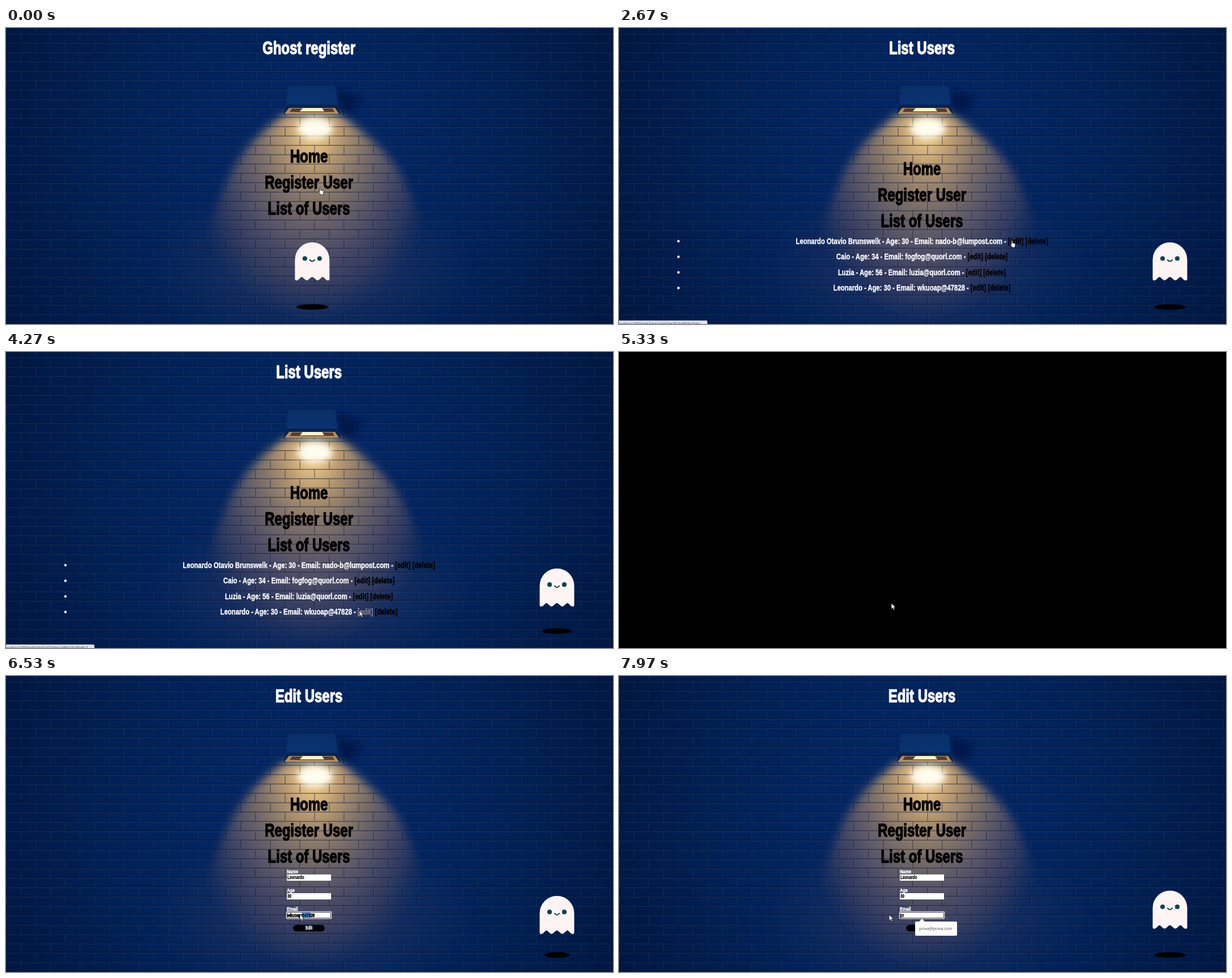
Write an HTML page that moves like this. It is 1072 px wide and 522 px high and loops after 8000 ms.

```html
<!DOCTYPE html>
<html lang="en">
<head>
<meta charset="utf-8">
<title>Ghost register</title>
<style>
  html, body { margin: 0; width: 100%; height: 100%; overflow: hidden; background: #000; }
  svg { display: block; width: 100%; height: 100%; }
  .heavy { font-family: "Liberation Sans", Arial, sans-serif; font-weight: 700; stroke-linejoin: round; }
  .tiny { font-family: "Open Sans", "Noto Sans", sans-serif; }
</style>
</head>
<body>
<svg id="stage" viewBox="0 0 1072 522" xmlns="http://www.w3.org/2000/svg">
  <defs>
    <radialGradient id="wall" gradientUnits="userSpaceOnUse" cx="540" cy="260" r="620">
      <stop offset="0" stop-color="#04296a"/>
      <stop offset=".55" stop-color="#012258"/>
      <stop offset="1" stop-color="#00163f"/>
    </radialGradient>
    <radialGradient id="beam" gradientUnits="userSpaceOnUse" cx="0" cy="0" r="1"
      gradientTransform="translate(542 172) scale(235 345)">
      <stop offset="0" stop-color="#fff0bd"/>
      <stop offset=".1" stop-color="#e2bf83"/>
      <stop offset=".22" stop-color="#b6976f"/>
      <stop offset=".4" stop-color="#857568" stop-opacity=".95"/>
      <stop offset=".62" stop-color="#5d5667" stop-opacity=".85"/>
      <stop offset=".82" stop-color="#43435f" stop-opacity=".6"/>
      <stop offset="1" stop-color="#2a3259" stop-opacity="0"/>
    </radialGradient>
    <radialGradient id="haze">
      <stop offset="0" stop-color="#4b4a66" stop-opacity=".6"/>
      <stop offset="1" stop-color="#2a3763" stop-opacity="0"/>
    </radialGradient>
    <linearGradient id="metal" x2="0" y2="1">
      <stop offset="0" stop-color="#0a2f66"/>
      <stop offset="1" stop-color="#073577"/>
    </linearGradient>
    <pattern id="bricks" width="52" height="33" patternUnits="userSpaceOnUse" x="17" y="8">
      <path d="M0 1H52M0 17.5H52M8 1V17.5M34 17.5V34" fill="none" stroke="#020d30" stroke-opacity=".5" stroke-width="1.3"/>
      <path d="M0 2.4H52M0 18.9H52M9.3 2V17M35.3 19V33" fill="none" stroke="#b9b4c8" stroke-opacity=".12"/>
    </pattern>
    <filter id="soft" x="-20%" y="-20%" width="140%" height="140%"><feGaussianBlur stdDeviation="8"/></filter>
    <filter id="glow" x="-50%" y="-50%" width="200%" height="200%"><feGaussianBlur stdDeviation="6"/></filter>
  </defs>

  <g id="scene">
    <rect width="1072" height="522" fill="url(#wall)"/>
    <ellipse cx="540" cy="420" rx="290" ry="150" fill="url(#haze)"/>
    <path d="M494 152C450 180 405 225 382 290C350 370 330 450 325 522H765C752 420 735 320 690 245C660 205 620 175 588 152Z"
      fill="url(#beam)" filter="url(#soft)"/>
    <rect width="1072" height="522" fill="url(#bricks)"/>
    <ellipse cx="546" cy="177" rx="31" ry="17" fill="#fffdf0" filter="url(#glow)"/>
    <path d="M584 106L628 122 614 150H590Z" fill="#00113a" opacity=".55" filter="url(#glow)"/>
    <path d="M499 102H582L586 136 590 151H490L495 136Z" fill="url(#metal)"/>
    <path d="M495 135H586L590 151H490Z" fill="#08244f"/>
    <path d="M500 141H581L588 151H492Z" fill="#b98d58"/>
    <path d="M505 142H577L580 148H501Z" fill="#503e38"/>
    <path d="M524 141H558L562 147H519Z" fill="#fff3c4"/>
    <g id="page"></g>
    <g id="ghost">
      <ellipse id="shade" cy="492" ry="5"/>
      <g id="spook">
        <path d="M-30.5 30.5A30.5 30.5 0 0 1 30.5 30.5V64Q30.5 68 26.5 67C22 65 21 61 18.5 61S13 67 9.5 67S3 61 0 61S-6 67 -9.5 67S-16 61 -18.5 61S-22 65 -26.5 67Q-30.5 68 -30.5 64Z" fill="#fdf4f3"/>
        <g fill="#0b4650"><circle cx="-13" cy="28.5" r="4.1"/><circle cx="13" cy="28.5" r="4.1"/></g>
        <path d="M-4.2 31Q0 36 4.2 31" fill="none" stroke="#0b4650" stroke-width="2" stroke-linecap="round"/>
      </g>
    </g>
    <g id="status">
      <path id="bar" fill="#dfe2e8" stroke="#aab0bd" stroke-width=".6"/>
      <text id="link" class="tiny" x="-2" y="523" font-size="6.1" fill="#3c4043"></text>
    </g>
  </g>
  <g id="arrow"><path d="M0 0V10.2L2.4 8.1 4 11.8 5.8 11 4.3 7.4H7.3Z" fill="#fff" stroke="#111" stroke-width=".7"/></g>
  <g id="hand"><path d="M0 1.2Q1 -.6 2 1.2V5L6.2 6Q7.3 6.4 7 8L6.2 13H1.6L-1.6 8.6Q-1.4 7 0 8Z" fill="#fff" stroke="#111" stroke-width=".8"/></g>
</svg>
<script>
const LOOP = 8000, PERIOD = 3000, CONDENSE = 0.75;
const $ = id => document.getElementById(id);

// Heavy condensed lettering, one shared proportion for every size
const heavy = (str, x, y, size, fill, anchor = 'middle', weight = size * 0.045) =>
  `<text class="heavy" transform="translate(${x} ${y}) scale(${CONDENSE} 1)" font-size="${size}" ` +
  `text-anchor="${anchor}" fill="${fill}" stroke="${fill}" stroke-width="${weight}">${str}</text>`;

const header = (title, drop) => heavy(title, 535, 46, 32, '#fff') +
  ['Home', 'Register User', 'List of Users']
    .map((s, i) => heavy(s, 535, 237 + drop + i * 45.8, 32, '#000')).join('');

const users = [
  ['Leonardo Otavio Brunswelk', 30, 'nado-b@lumpost.com'],
  ['Caio', 34, 'fogfog@quorl.com'],
  ['Luzia', 56, 'luzia@quorl.com'],
  ['Leonardo', 30, 'wkuoap@47828']
];

function listPage(hot) {
  const rows = users.map(([name, age, mail], i) => {
    const y = 380.5 + i * 27.5;
    const tone = hot && i === 3 ? '#85808a' : '#000';
    const link = (s, c) => `<tspan fill="${c}" stroke="${c}">[${s}]</tspan>`;
    return `<circle cx="105" cy="${y - 4.5}" r="2.2" fill="#fff"/>` +
      heavy(`${name} - Age: ${age} - Email: ${mail} - ${link('edit', tone)} ${link('delete', '#000')}`,
        535, y, 15, '#fff', 'middle', 0.4);
  });
  return header('List Users', 22) + rows.join('');
}

function field(label, value, y) {
  return heavy(label, 496, y - 2, 9.8, '#fff', 'start') +
    `<rect x="496" y="${y}" width="78" height="11" fill="#fff"/>` +
    heavy(value, 497, y + 8.4, 8.6, '#000', 'start', 0.25);
}

// picked: share of the address selected, from its right end
function editPage(focus, picked, typed) {
  const mail = users[3][2];
  let out = header('Edit Users', 0) + field('Name', users[3][0], 350) + field('Age', '30', 383) +
    field('Email', typed || mail, 416.3);
  if (focus) out += '<rect x="495.6" y="415.8" width="78.8" height="12" rx="1.5" fill="none" stroke="#fff" stroke-width="1.6"/>' +
    '<rect x="496.4" y="416.6" width="77.2" height="10.4" rx="1" fill="none" stroke="#111" stroke-width=".9"/>';
  if (picked) {
    const w = 41 * picked;
    out += `<rect x="${538 - w}" y="417.4" width="${w}" height="9" fill="#3b8ee8"/>`;
    out += heavy(mail, 497, 424.7, 8.6, picked > 0.6 ? '#fff' : '#000', 'start', 0.2);
  }
  out += '<rect x="507" y="439" width="56" height="11.5" rx="5.7"/>' + heavy('Edit', 535, 447.4, 8.6, '#fff');
  if (typed) out += '<path d="M525 433H530L535 428 540 433H595Q597 433 597 435V456Q597 458 595 458H525Q523 458 523 456V435Q523 433 525 433Z" fill="#fff"/>' +
    '<text class="tiny" x="530" y="447.8" font-size="6.9" fill="#444">prova@prova.com</text>';
  return out;
}

// time, x, y of the pointer tip
const trail = [
  [0, 554, 281], [100, 554, 281], [350, 549, 318], [500, 549, 322], [930, 575, 351],
  [1070, 693, 374], [2670, 693, 374], [3470, 562, 18], [3750, 575, 60], [4200, 624, 456],
  [4400, 624, 456], [4640, 786, 63], [4930, 481, 443], [5400, 481, 443], [5770, 509, 443],
  [6130, 540, 420], [6350, 540, 420], [6820, 477, 421], [LOOP, 477, 421]
];

const clamp = v => Math.min(1, Math.max(0, v));
const ease = v => v * v * (3 - 2 * v);

function pointer(t) {
  const i = trail.findIndex(p => p[0] > t);
  const [a, b] = [trail[i - 1], trail[i]];
  const k = ease((t - a[0]) / (b[0] - a[0]));
  return [a[1] + (b[1] - a[1]) * k, a[2] + (b[2] - a[2]) * k];
}

const within = (t, from, to) => t >= from && t < to;

function floatPhase(t) {
  if (t < 430) return Math.max(0, t - 100) / PERIOD;
  if (t < 3600) return Math.max(0, t - 2670) / PERIOD;
  if (t < 5270) return (Math.min(t, 4300) - 3670) / PERIOD;
  return 0.335 + (t - 5770) / PERIOD;
}

function statusText(t) {
  const base = 'localhost:5500/';
  if (within(t, 200, 1040)) return base + 'listUsers';
  if (within(t, 1040, 3550)) return base + 'edit?id=61dcb07ee391fc4f00bd7abc';
  if (within(t, 4180, 4450)) return base + 'edit?id=62d53c8ea194f0d7b2f6d413';
  return '';
}

function pageMarkup(t) {
  if (t < 430) return header('Ghost register', 0);
  if (t < 5270) return listPage(within(t, 4180, 4450));
  const typed = t < 7640 ? '' : t < 7800 ? 'p' : 'pr';
  return editPage(t >= 6300, typed ? 0 : clamp((t - 6380) / 400), typed);
}

let shown = '';
function draw(t) {
  const dark = within(t, 430, 500) || within(t, 3600, 3670) || within(t, 5270, 5400);
  $('scene').style.display = dark ? 'none' : '';

  const markup = pageMarkup(t);
  if (markup !== shown) $('page').innerHTML = shown = markup;

  const k = (1 - Math.cos(2 * Math.PI * floatPhase(t))) / 2;
  $('ghost').setAttribute('transform', `translate(${t < 430 ? 540.8 : 973} 0)`);
  $('spook').setAttribute('transform', `translate(0 ${378 + 10.5 * k})`);
  $('shade').setAttribute('rx', 28 - 6.5 * k ** 1.6);

  const link = statusText(t);
  const w = link.length > 30 ? 156 : 78;
  $('status').style.display = link ? '' : 'none';
  $('link').textContent = link;
  $('bar').setAttribute('d', `M-2 516H${w - 2}Q${w} 516 ${w} 518V524H-2Z`);

  const [x, y] = pointer(t);
  const onLink = t < 430 || within(t, 500, 800) || within(t, 1040, 2720);
  for (const id of ['arrow', 'hand']) {
    $(id).style.display = (id === 'hand') === onLink ? '' : 'none';
    $(id).setAttribute('transform', `translate(${x} ${y})`);
  }
}

const start = performance.now();
function tick() {
  draw((performance.now() - start) % LOOP);
  requestAnimationFrame(tick);
}
tick();
</script>
</body>
</html>
```
